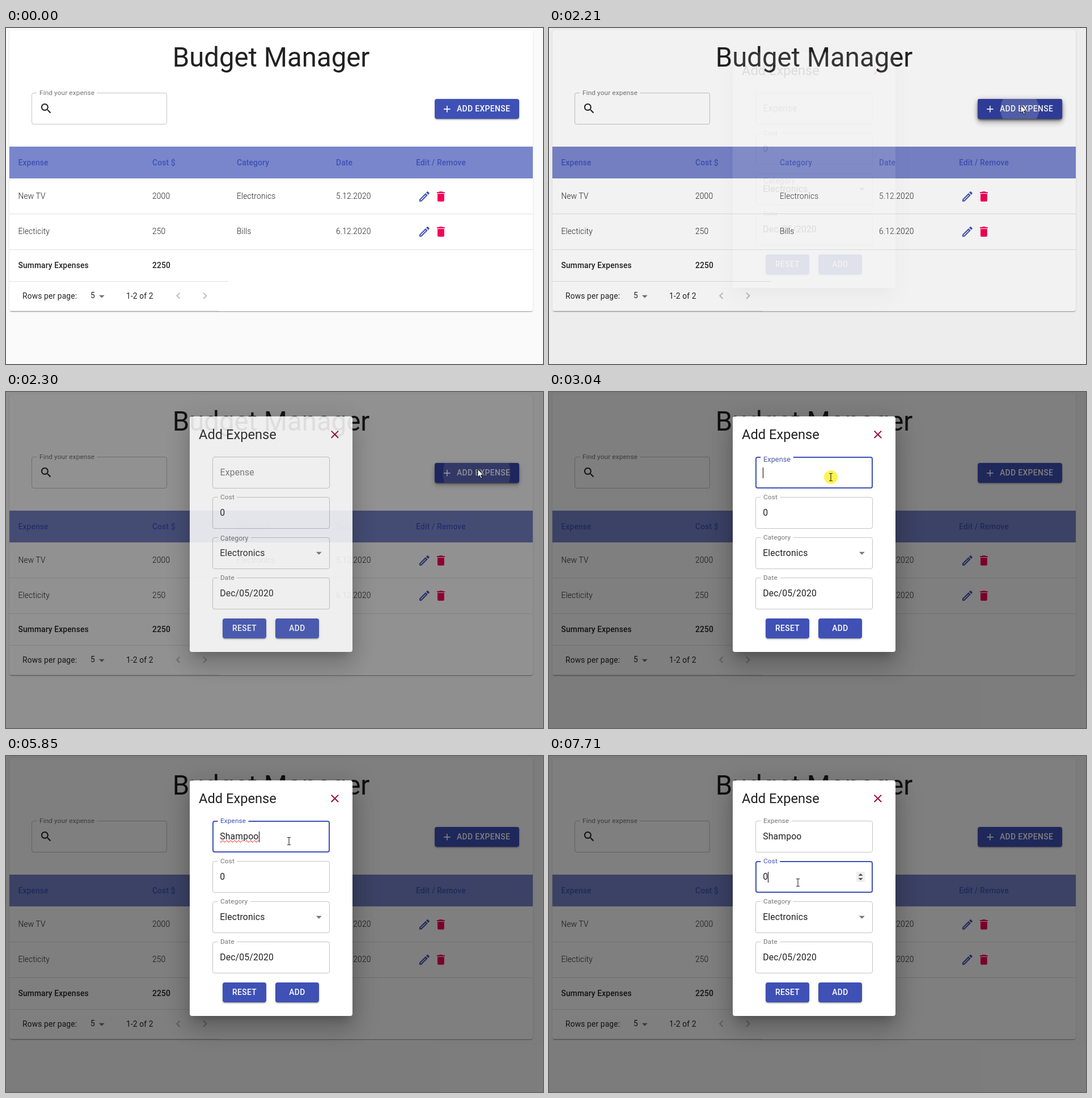
An HTML page that plays this animation: 947x592 px, repeating every 8 s.

```html
<!DOCTYPE html>
<html lang="en">
<head>
<meta charset="utf-8">
<title>Budget Manager</title>
<style>
html, body { margin: 0; width: 100%; height: 100%; overflow: hidden; background: #fafafa; }
body { position: relative; font: 13.8px/20px Roboto, sans-serif; letter-spacing: .148px; color: rgba(0,0,0,.87); }
div, svg, label, .caret { position: absolute; box-sizing: border-box; }
div, label { white-space: nowrap; }
svg { overflow: visible; }
.card { background: #fff; border-radius: 4px;
  box-shadow: 0 2px 1px -1px rgba(0,0,0,.2), 0 1px 1px rgba(0,0,0,.14), 0 1px 3px rgba(0,0,0,.12); }
.modal { box-shadow: 0 11px 15px -7px rgba(0,0,0,.2), 0 24px 38px 3px rgba(0,0,0,.14), 0 9px 46px 8px rgba(0,0,0,.12); }
.title { font-size: 47.3px; letter-spacing: 0; text-align: center; }
.heading { font-size: 23.66px; letter-spacing: 0; }
.light { font-weight: 300; }
.bold { font-weight: 500; }
.head { font-weight: 500; color: #3f51b5; }
.line { background: #e0e0e0; }
.button { background: #3f51b5; border-radius: 4px; color: #fff; font-weight: 500; letter-spacing: .394px;
  line-height: 35px; text-align: center;
  box-shadow: 0 3px 1px -2px rgba(0,0,0,.2), 0 2px 2px rgba(0,0,0,.14), 0 1px 5px rgba(0,0,0,.12); }
.hover-layer { background: #303f9f; border-radius: 4px;
  box-shadow: 0 2px 4px -1px rgba(0,0,0,.2), 0 4px 5px rgba(0,0,0,.14), 0 1px 10px rgba(0,0,0,.12); }
.press-layer { background: #303f9f; border-radius: 4px;
  box-shadow: 0 5px 5px -3px rgba(0,0,0,.2), 0 8px 10px 1px rgba(0,0,0,.14), 0 3px 14px 2px rgba(0,0,0,.12); }
.clip { overflow: hidden; border-radius: 4px; }
.ripple { border-radius: 50%; background: #fff; }
.field { border: 1px solid rgba(0,0,0,.23); border-radius: 4px; }
.field.hover { border-color: rgba(0,0,0,.87); }
.field.focus { border: 2px solid #3f51b5; }
label { font-size: 15.78px; line-height: 16px; padding: 0 6px; background: #fff; color: #757575; transform-origin: 6px 0; }
.value { font-size: 15.78px; }
.misspelt { text-decoration: underline wavy #f00 1px; text-underline-offset: 1px; }
.caret { top: 1px; width: 1px; height: 19px; background: #000; }
.spinner { background: #efefef; }
.halo { border-radius: 50%; background: #fff352; }
</style>
</head>
<body>
<script>
const BLUE = '#3f51b5', PINK = '#f50057', GREY = 'rgba(0,0,0,.54)', PALE = 'rgba(0,0,0,.26)';
const PATHS = {
  search: 'M15.5 14h-.79l-.28-.27C15.41 12.59 16 11.11 16 9.5 16 5.91 13.09 3 9.5 3S3 5.91 3 9.5 5.91 16 9.5 16c1.61 0 3.09-.59 4.23-1.57l.27.28v.79l5 4.99L20.49 19l-4.99-5zm-6 0C7.01 14 5 11.99 5 9.5S7.01 5 9.5 5 14 7.01 14 9.5 11.99 14 9.5 14z',
  plus: 'M19 13h-6v6h-2v-6H5v-2h6V5h2v6h6v2z',
  pencil: 'M14.06 9.02l.92.92L5.92 19H5v-.92l9.06-9.06M17.66 3c-.25 0-.51.1-.7.29l-1.83 1.83 3.75 3.75 1.83-1.83c.39-.39.39-1.02 0-1.41l-2.34-2.34c-.2-.2-.45-.29-.71-.29zm-3.6 3.19L3 17.25V21h3.75L17.81 9.94l-3.75-3.75z',
  bin: 'M6 19c0 1.1.9 2 2 2h8c1.1 0 2-.9 2-2V7H6v12zM19 4h-3.5l-1-1h-5l-1 1H5v2h14V4z',
  down: 'M7 10l5 5 5-5z',
  left: 'M15.41 16.59L10.83 12l4.58-4.59L14 6l-6 6 6 6 1.41-1.41z',
  right: 'M8.59 16.59L13.17 12 8.59 7.41 10 6l6 6-6 6-1.41-1.41z',
  close: 'M19 6.41L17.59 5 12 10.59 6.41 5 5 6.41 10.59 12 5 17.59 6.41 19 12 13.41 17.59 19 19 17.59 13.41 12z',
  steppers: 'M3.5 7L7.5 3l4 4zM3.5 11l4 4 4-4z',
  arrow: 'M0 0v14l3.2-3 2.2 5.2 2.2-.9-2.2-5.1h4.4z',
  beam: 'M-3-6.5h2.2L0-6l.8-.5H3M-3 6.5h2.2L0 6l.8.5H3M0-6V6'
};

function box(parent, x, y, w, h, cls = '', html = '', tag = 'div') {
  const el = document.createElement(tag);
  el.className = cls;
  el.innerHTML = html;
  el.style.cssText = `left:${x}px;top:${y}px;` + (w ? `width:${w}px;height:${h}px` : '');
  return parent.appendChild(el);
}
const text = (parent, x, middle, str, cls) => box(parent, x, middle - 10, 0, 0, cls, str);
const icon = (parent, x, y, name, color, size = 23.7) =>
  box(parent, x, y, 0, 0, '', `<svg width="${size}" height="${size}" viewBox="0 0 24 24"><path d="${PATHS[name]}" fill="${color}"/></svg>`);
function field(parent, x, y, w, name, value = '') {
  const outline = box(parent, x, y, w, 56, 'field');
  const label = box(parent, x + 8, y, 0, 0, '', name, 'label');
  const input = text(parent, x + 13.6, y + 28, `<span>${value}</span><i class="caret"></i>`, 'value');
  const [content, caret] = input.children;
  caret.hidden = true;
  const shrink = p => label.style.transform = `translateY(${20 - 26 * p}px) scale(${1 - p / 4})`;
  shrink(1);
  return { outline, label, content, caret, shrink };
}

// Page
const page = document.body;
box(page, 6, 4, 923, 495, 'card');
box(page, 6, 42, 923, 20, 'title', 'Budget Manager');
field(page, 45, 114, 239, 'Find your expense');
icon(page, 59, 130, 'search', 'rgba(0,0,0,.87)');

const add = box(page, 756, 125, 149, 35, 'button');
const hoverLayer = box(add, 0, 0, 149, 35, 'hover-layer');
const pressLayer = box(add, 0, 0, 149, 35, 'press-layer');
icon(add, 12, 7.5, 'plus', '#fff', 19.7);
box(add, 39, 0, 0, 0, '', 'ADD EXPENSE');
const ripple = box(box(add, 0, 0, 149, 35, 'clip'), -4, -60, 156, 156, 'ripple');

box(page, 6, 209, 923, 56).style.background = '#7986cb';
const columns = [21.5, 258, 407, 582, 723];
const row = (middle, cells, cls) => cells.forEach((s, i) => text(page, columns[i], middle, s, cls));
row(237, ['Expense', 'Cost $', 'Category', 'Date', 'Edit / Remove'], 'head');
row(296, ['New TV', '2000', 'Electronics', '5.12.2020'], 'light');
row(358, ['Electicity', '250', 'Bills', '6.12.2020'], 'light');
row(418, ['Summary Expenses', '2250'], 'bold');
for (const y of [285, 347]) {
  icon(page, 726, y, 'pencil', BLUE);
  icon(page, 755, y, 'bin', PINK);
}
for (const [y, w] of [[327, 923], [390, 923], [446, 386], [498, 370]]) box(page, 6, y, w, 1, 'line');
text(page, 29, 472, 'Rows per page:');
text(page, 149, 471, '5');
text(page, 212, 472, '1-2 of 2');
icon(page, 157, 460.5, 'down', GREY);
icon(page, 292, 460, 'left', PALE);
icon(page, 339, 460, 'right', PALE);

// Dialog
const backdrop = box(page, 0, 0, 947, 592);
backdrop.style.background = 'rgba(0,0,0,.5)';
const dialog = box(page, 0, 0, 947, 592);
box(dialog, 324, 43, 287, 415, 'card modal');
text(dialog, 340, 75, 'Add Expense', 'heading');
icon(dialog, 568, 63, 'close', '#9b0036');
const [expense, cost, category] = [['Expense'], ['Cost', '0'], ['Category', 'Electronics'], ['Date', 'Dec/05/2020']]
  .map(([name, value], i) => field(dialog, 363.6, 114 + 71 * i, 207, name, value));
const spinner = box(dialog, 542, 204, 15, 18, 'spinner', `<svg width="15" height="18"><path d="${PATHS.steppers}" fill="#505050"/></svg>`);
icon(dialog, 540, 272, 'down', GREY);
box(dialog, 382, 399, 77, 35, 'button', 'RESET');
box(dialog, 475, 399, 77, 35, 'button', 'ADD');

// Pointer
const halo = box(page, -12, -12, 24, 24, 'halo');
const pointer = box(page, 0, 0, 1, 1, '', `<svg width="1" height="1"><path d="${PATHS.arrow}" fill="#fff" stroke="#000" stroke-width=".9"/></svg>` +
  `<svg width="1" height="1"><path d="${PATHS.beam}" fill="none" stroke="#222" stroke-width="1.1"/></svg>`);
const [arrow, beam] = pointer.children;

// Timeline in milliseconds
const LOOP = 8000, PRESS = 2020, OPEN = 2171, FOCUS = 2950, REFOCUS = 7150;
const KEYS = [3730, 3910, 4190, 4290, 4520, 4600, 4800];
const MOVES = [[350, 845, 594], [1150, 866, 283], [1700, 832, 136], [2400, 832, 136], [2800, 497, 150],
  [3060, 497, 150], [3160, 499, 150], [6180, 499, 150], [6640, 439, 223]];
const CARET = [[FOCUS, 3500], [3730, 5340], [5850, 6350], [6920, REFOCUS]];
const CLICKS = [[PRESS, 2150], [FOCUS, 3150], [REFOCUS, 7330], [7530, 7710]];

const within = (t, spans) => spans.some(([a, b]) => t >= a && t < b);
const progress = (t, start, length) => Math.min(1, Math.max(0, (t - start) / length));
// Cubic Bezier easing (x1, 0, .2, 1)
function ease(x, x1 = .4) {
  let lo = 0, hi = 1, u;
  for (let i = 0; i < 20; i++) {
    u = (lo + hi) / 2;
    const at = 3 * u * (1 - u) * ((1 - u) * x1 + u * .2) + u ** 3;
    if (at < x) lo = u; else hi = u;
  }
  return u * u * (3 - 2 * u);
}
const easeOut = x => ease(x, 0);

function pointerAt(t) {
  const next = MOVES.findIndex(m => m[0] > t);
  if (next < 1) return MOVES[next ? MOVES.length - 1 : 0].slice(1);
  const [a, b] = [MOVES[next - 1], MOVES[next]], p = (t - a[0]) / (b[0] - a[0]);
  return [a[1] + (b[1] - a[1]) * p, a[2] + (b[2] - a[2]) * p];
}

function render(t) {
  const fade = ease(progress(t, OPEN, 225));
  backdrop.style.opacity = dialog.style.opacity = fade;

  const release = ease(progress(t, 2210, 250));
  hoverLayer.style.opacity = ease(progress(t, 1450, 250)) - release;
  pressLayer.style.opacity = ease(progress(t, PRESS, 250)) - release;
  const grow = ease(progress(t, PRESS + 12, 550));
  ripple.style.transform = `scale(${grow})`;
  ripple.style.opacity = (.1 + .2 * grow) * (1 - ease(progress(t, 2150, 550)));

  const [x, y] = pointerAt(t);
  const overField = t > 2400 && x < 571;
  const overExpense = overField && y < 170, overCost = overField && y > 185;
  const inExpense = t >= FOCUS && t < REFOCUS, inCost = t >= REFOCUS;

  category.shrink(easeOut(progress(t, OPEN, 200)));
  expense.shrink(easeOut(progress(t, FOCUS, 200)));
  expense.outline.className = 'field' + (inExpense ? ' focus' : overExpense ? ' hover' : '');
  cost.outline.className = 'field' + (inCost ? ' focus' : overCost ? ' hover' : '');
  const tint = 100 * easeOut(progress(t, REFOCUS, 200));
  const blueing = 100 * easeOut(progress(t, FOCUS, 200));
  expense.label.style.color = `color-mix(in srgb, ${BLUE} ${blueing - tint}%, #757575)`;
  cost.label.style.color = `color-mix(in srgb, ${BLUE} ${tint}%, #757575)`;

  expense.content.textContent = 'Shampoo'.slice(0, KEYS.filter(k => k <= t).length);
  expense.content.className = t >= 5850 && inExpense ? 'misspelt' : '';
  expense.caret.hidden = !within(t, CARET);
  cost.caret.hidden = !inCost;
  spinner.hidden = !(overCost || inCost);

  pointer.hidden = t < MOVES[0][0];
  pointer.style.transform = halo.style.transform = `translate(${x}px, ${y}px)`;
  const isBeam = overExpense || overCost;
  arrow.style.display = isBeam ? 'none' : '';
  beam.style.display = isBeam ? '' : 'none';
  halo.hidden = !within(t, CLICKS);
}

const began = performance.now();
(function tick() {
  render((performance.now() - began) % LOOP);
  requestAnimationFrame(tick);
})();
</script>
</body>
</html>
```
